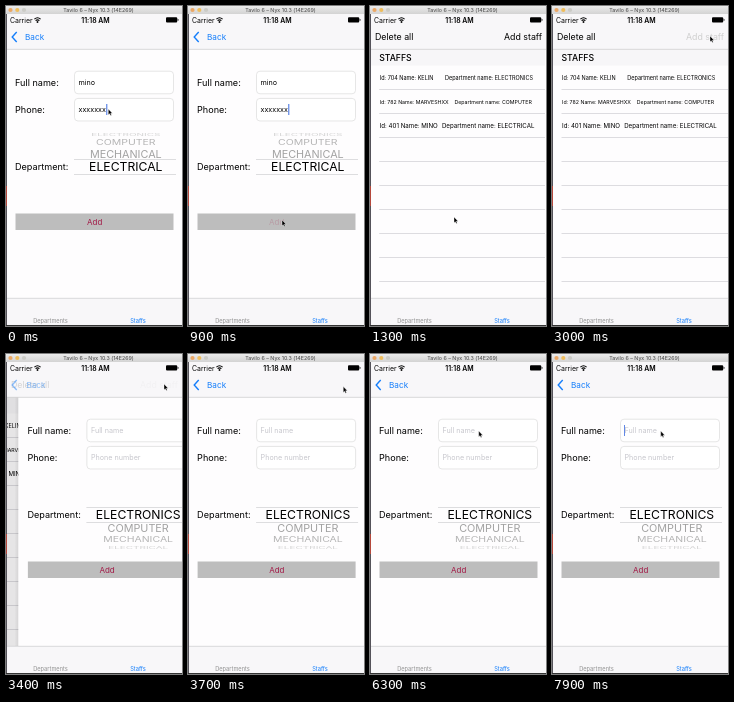
An HTML page for the animation above (8000 ms loop, 176 by 320 pixels).

```html
<!DOCTYPE html>
<html lang="en">
<head>
<meta charset="utf-8">
<title>Staff list</title>
<style>
  html, body { margin: 0; width: 100%; height: 100%; overflow: hidden; background: #fff; }
  svg { display: block; width: 100vw; height: 100vh; }
  text { font-family: Inter, Roboto, "Liberation Sans", sans-serif; white-space: pre; }
  .mid { text-anchor: middle; }
  .blue { fill: #147efb; }
  .label { font-size: 9.1px; }
  .input { font-size: 7.2px; }
  .hint { font-size: 7.2px; fill: #c7c7cd; }
  .nav { font-size: 8.8px; }
  .page { fill: #fefdfe; }
  .bar { fill: #f8f7f9; }
  .field { fill: #fff; stroke: #dcdcdc; stroke-width: .7; }
  .rule { stroke: #c8c8cc; stroke-width: .6; }
  .line { stroke: #dad9dd; stroke-width: .9; }
</style>
</head>
<body>
<svg viewBox="0 0 176 320" preserveAspectRatio="none">
  <defs>
    <linearGradient id="chrome" x2="0" y2="1">
      <stop stop-color="#ebebeb"/><stop offset="1" stop-color="#d3d3d3"/>
    </linearGradient>
    <linearGradient id="shade">
      <stop stop-color="#000" stop-opacity="0"/><stop offset="1" stop-color="#000" stop-opacity=".08"/>
    </linearGradient>
  </defs>
  <rect class="page" width="176" height="320"/>

  <g id="list">
    <rect y="43" width="230" height="16.5" fill="#f7f6f8"/>
    <text x="9.5" y="54.6" font-size="8.7" font-weight="500">STAFFS</text>
    <g id="rows"></g>
    <rect id="dim" y="43" width="230" height="250" opacity="0"/>
  </g>

  <g id="form">
    <rect id="edge" x="-4" y="43" width="4" height="250" fill="url(#shade)"/>
    <rect class="page" y="43" width="178" height="250"/>
    <text class="label" x="9" y="79.6">Full name:</text>
    <text class="label" x="9" y="106.8">Phone:</text>
    <text class="label" x="9" y="164">Department:</text>
    <rect class="field" x="68.5" y="65.2" width="99" height="22.6" rx="3.5"/>
    <rect class="field" x="68.5" y="92.4" width="99" height="22.6" rx="3.5"/>
    <g id="filled">
      <text class="input" x="72.5" y="79">mino</text>
      <text class="input" x="72.5" y="106.4">xxxxxxx</text>
    </g>
    <g id="empty">
      <text class="hint" x="72.5" y="79">Full name</text>
      <text class="hint" x="72.5" y="106.4">Phone number</text>
    </g>
    <rect id="caret" width="1" height="11" fill="#3b6be0"/>
    <path class="rule" d="M68 153.5H170M68 168.5H170"/>
    <rect x="9.5" y="207.5" width="158" height="16.5" fill="#bdbdbd"/>
    <text id="add" class="mid" x="88.7" y="218.8" font-size="8" fill="#a21c48">Add</text>
  </g>

  <rect class="bar" y="8" width="176" height="35.5"/>
  <path d="M0 43.3H176" stroke="#b4b4b6" stroke-width=".5"/>
  <g id="listNav" class="nav">
    <text x="5" y="34.2">Delete all</text>
    <text id="staff" x="172" y="34.2" text-anchor="end">Add staff</text>
  </g>
  <g id="back">
    <path d="M10.7 26L6.2 31L10.7 36" fill="none" stroke="#147efb" stroke-width="1.4"/>
    <text id="backText" class="blue" x="19" y="34.2" font-size="8.2">Back</text>
  </g>

  <text x="4" y="16.5" font-size="6.9">Carrier</text>
  <g fill="none" stroke="#000" stroke-width="1.1">
    <path d="M28.4 13.1Q31.5 10.3 34.6 13.1M29.6 14.7Q31.5 13 33.4 14.7"/>
    <circle cx="31.5" cy="16" r=".4"/>
  </g>
  <text class="mid" x="89.5" y="16.5" font-size="6.9" font-weight="600">11:18 AM</text>
  <rect x="160" y="11.2" width="11.2" height="5.2" rx="1"/>
  <rect x="171.6" y="13" width=".8" height="1.8"/>

  <rect class="bar" y="292" width="176" height="28"/>
  <path d="M0 292.3H176" stroke="#b8b8ba" stroke-width=".5"/>
  <text class="mid" x="44.5" y="317.2" font-size="5.7" fill="#929292">Departments</text>
  <text class="mid blue" x="132" y="317.2" font-size="5.7">Staffs</text>

  <rect width="176" height="8" fill="url(#chrome)"/>
  <circle cx="4.5" cy="4" r="2.1" fill="#eba765"/>
  <circle cx="11.3" cy="4" r="2.1" fill="#efbd5c"/>
  <circle cx="18" cy="4" r="2.1" fill="#cbcbc6"/>
  <text class="mid" x="92.5" y="6" font-size="5.3" fill="#444">Tavilo 6 – Nyx 10.3 (14E269)</text>
  <rect y="8" width="1" height="312" fill="#55535a"/>
  <rect y="180" width="1" height="20" fill="#b5483c"/>
  <rect y="319" width="176" height="1" fill="#333"/>

  <path id="mouse" d="M0 0V5.8L1.3 4.7L2.2 6.6L3.2 6.2L2.4 4.2H4.1Z" fill="#000" stroke="#fff" stroke-width=".4"/>
</svg>
<script>
const LOOP = 8000, STEP = 100, WIDTH = 176;
const POP = 900, PUSH = 3163;
const $ = id => document.getElementById(id);
const clamp = v => Math.max(0, Math.min(1, v));
const move = (el, x, y = 0) => el.setAttribute("transform", `translate(${x} ${y})`);
const fade = (el, a) => el.setAttribute("opacity", a);

function make(parent, tag, attrs, text = "") {
  const el = document.createElementNS("http://www.w3.org/2000/svg", tag);
  for (const k in attrs) el.setAttribute(k, attrs[k]);
  el.textContent = text;
  parent.append(el);
}

// [person, department, font size, department x]
const staff = [
  ["704 Name: KELIN", "ELECTRONICS", 5.5, 75.3],
  ["782 Name: MARVESHXX", "COMPUTER", 5.25, 84.8],
  ["401 Name: MINO", "ELECTRICAL", 6.15, 72.2]
];
staff.forEach(([who, dept, size, x], i) => {
  const y = 73.6 + 24 * i;
  make($("rows"), "text", { x: 10, y, "font-size": size }, "Id: " + who);
  make($("rows"), "text", { x, y, "font-size": size }, "Department name: " + dept);
});
for (let i = 0; i < 9; i++) {
  make($("rows"), "path", { class: "line", d: `M9.5 ${83.5 + 24 * i}H230` });
}

// wheel rows by distance from the selected one: offset, size, flattening, colour
const wheel = [
  [0, 12.2, 1, "#000"], [13, 10.8, .95, "#a2a2a2"],
  [24.5, 10.5, .72, "#b4b4b4"], [32.5, 10, .34, "#d4d4d4"]
];
function picker(parent, names, dir) {
  names.forEach((name, i) => {
    const [off, size, flat, fill] = wheel[i];
    const transform = `translate(119.8 ${161 + dir * off}) scale(1 ${flat})`;
    make(parent, "text", { class: "mid", y: size * .36, "font-size": size, fill, transform }, name);
  });
}
const depts = ["ELECTRONICS", "COMPUTER", "MECHANICAL", "ELECTRICAL"];
picker($("empty"), depts, 1);
picker($("filled"), [...depts].reverse(), -1);

// pointer stops: time, x, y
const stops = [
  [0, 102.3, 103], [800, 94, 214], [1000, 94, 214], [1300, 84, 211],
  [1800, 84, 211], [2300, 138, 105], [2400, 138, 105], [2900, 158, 30],
  [3600, 158, 30], [4300, 108.7, 77], [LOOP, 108.7, 77]
];
function pointer(t) {
  const i = stops.findIndex(s => s[0] > t);
  const [t0, x0, y0] = stops[i - 1], [t1, x1, y1] = stops[i];
  const u = (t - t0) / (t1 - t0), e = u * u * (3 - 2 * u);
  return [x0 + (x1 - x0) * e, y0 + (y1 - y0) * e];
}

function spring(ms) {
  const w = Math.max(0, ms) * .01826;
  return ms > 700 ? 1 : 1 - (1 + w) * Math.exp(-w);
}

function blink(p) {
  return p < 400 ? clamp((p + 100) / 300) : clamp(1 - (p - 300) / 500);
}

function draw(t) {
  const first = t < 2000;
  const shown = first ? 1 - spring(t - POP) : spring(t - PUSH);
  move($("form"), WIDTH * (1 - shown));
  move($("list"), -.3 * WIDTH * shown);
  fade($("dim"), .1 * shown);
  fade($("edge"), shown);
  fade($("filled"), first ? 1 : 0);
  fade($("empty"), first ? 0 : 1);

  const u = first ? 1 - clamp((t - POP) / 350) : clamp((t - PUSH) / 500);
  fade($("listNav"), clamp(1 - 1.8 * u));
  fade($("back"), u);
  move($("backText"), 20 * (1 - shown));
  $("staff").setAttribute("fill", t >= 2900 ? "#cfcfcf" : "#000");
  fade($("add"), t >= 900 && t < 1000 ? .2 : 1);

  if (first) move($("caret"), 100.3, 98);
  else move($("caret"), 72, 71);
  fade($("caret"), first ? blink((t + 300) % 1000) : t < 4500 ? 0 : blink((t - 4500) % 1000));
  move($("mouse"), ...pointer(t));
}

const start = performance.now();
function tick() {
  const t = (performance.now() - start) % LOOP;
  draw(Math.floor(t / STEP) * STEP);
  requestAnimationFrame(tick);
}
tick();
</script>
</body>
</html>
```
